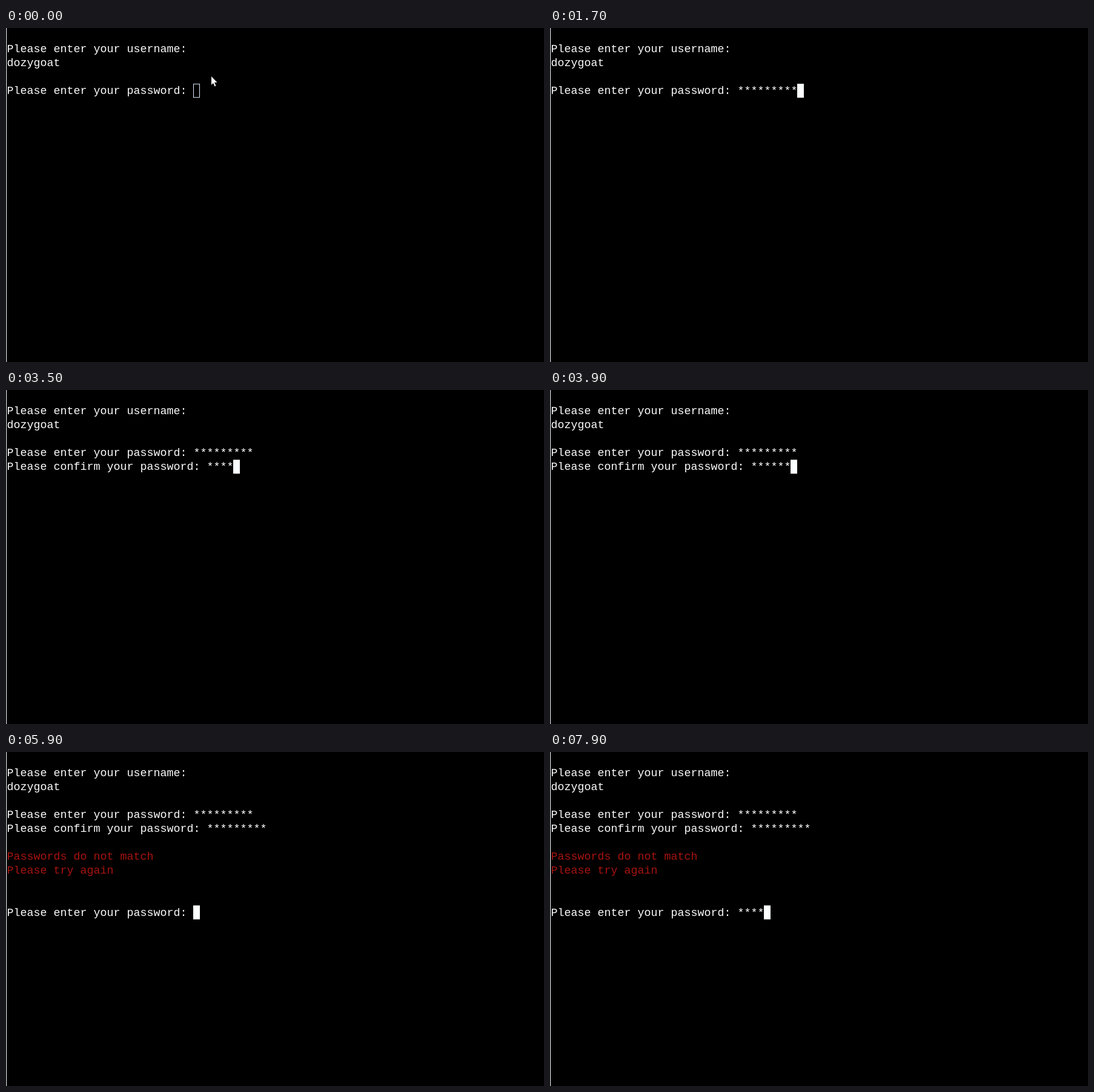
Recreate the animation shown at these times as an HTML page. Size 888x552 px, loop 8000 ms.

```html
<!DOCTYPE html>
<html lang="en">
<head>
<meta charset="utf-8">
<title>Password prompt</title>
<style>
  html, body { margin: 0; width: 100%; height: 100%; overflow: hidden; background: #000; }
  svg { display: block; width: 888px; height: 552px; }
  text { font: 18.333px "Liberation Mono", "Courier New", monospace; fill: #fcfcfc; white-space: pre; }
  .error { fill: #a8140f; }
</style>
</head>
<body>
<svg id="stage" viewBox="0 0 888 552">
  <rect width="888" height="552" fill="#000"/>
  <rect width="1" height="552" fill="#f4ffff"/>
  <g id="lines"></g>
  <rect id="caret"/>
  <path id="pointer" fill="#fff" d="M339 80V94L342 91L344.5 96.5L346.5 95.5L344 90H348.5Z"/>
</svg>
<script>
const LOOP = 8000, CELL = 11, ROW = 23.05, LEFT = 1, TEXT_LEFT = 1.5, BASELINE = 17;
const ENTER = "Please enter your password: ";
const CONFIRM = "Please confirm your password: ";

// Each prompt: its row, when it appears, and when each star is typed.
const prompts = [
  { row: 4, label: ENTER, from: 0, keys: [100, 100, 300, 600, 700, 900, 1400, 1500, 1700] },
  { row: 5, label: CONFIRM, from: 2100, keys: [2800, 2900, 3100, 3500, 3700, 3900, 4400, 4600, 4800] },
  { row: 11, label: ENTER, from: 5900, keys: [7400, 7600, 7700, 7900] }
];
const messages = [
  { row: 1, label: "Please enter your username:", from: 0 },
  { row: 2, label: "dozygoat", from: 0 },
  { row: 7, label: "Passwords do not match", from: 5900, style: "error" },
  { row: 8, label: "Please try again", from: 5900, style: "error" }
];

const byId = id => document.getElementById(id);
const caret = byId("caret"), pointer = byId("pointer");

function setAttrs(node, attrs) {
  for (const name in attrs) node.setAttribute(name, attrs[name]);
}

function addLine(line) {
  line.node = document.createElementNS("http://www.w3.org/2000/svg", "text");
  setAttrs(line.node, { x: TEXT_LEFT, y: line.row * ROW + BASELINE, class: line.style || "" });
  line.node.textContent = line.label;
  byId("lines").append(line.node);
}

function placeCaret(row, column, focused) {
  const inset = focused ? 0 : 0.5;
  setAttrs(caret, {
    x: LEFT + column * CELL + inset,
    y: row * ROW + inset,
    width: CELL - 2 * inset,
    height: ROW - 2 * inset,
    fill: focused ? "#fcffff" : "none",
    stroke: focused ? "none" : "#dceaff"
  });
}

function render(time) {
  const focused = time >= 100;
  for (const line of [...messages, ...prompts]) {
    line.node.style.display = time >= line.from ? "" : "none";
  }
  for (const { row, label, from, keys, node } of prompts) {
    if (time < from) continue;
    const typed = label + "*".repeat(keys.filter(key => key <= time).length);
    if (node.textContent !== typed) node.textContent = typed;
    placeCaret(row, typed.length, focused);
  }
  pointer.style.display = focused ? "none" : "";
}

[...messages, ...prompts].forEach(addLine);
const start = performance.now();
function tick() {
  render((performance.now() - start) % LOOP);
  requestAnimationFrame(tick);
}
tick();
</script>
</body>
</html>
```
